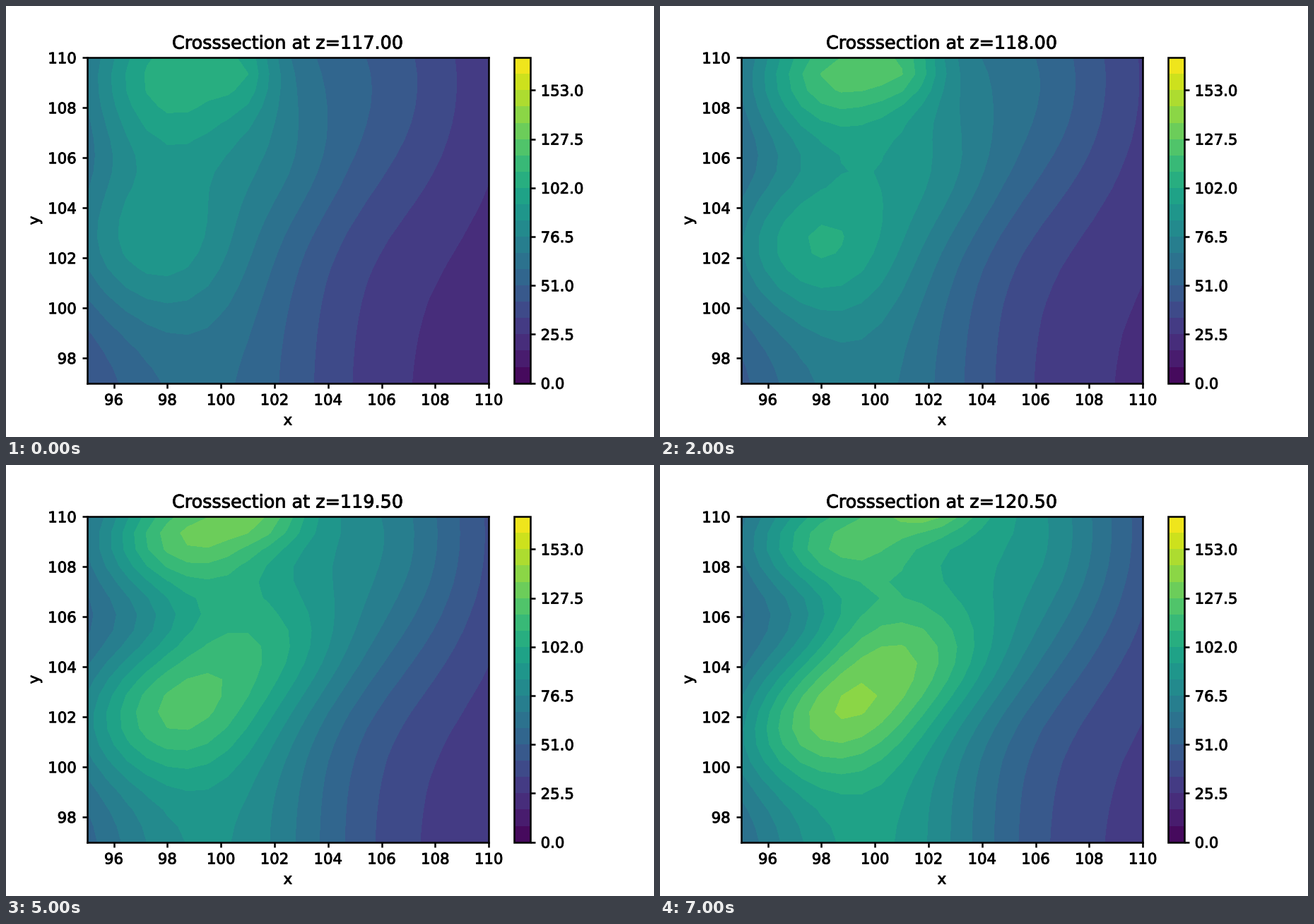
Recreate the animation shown at these times as a matplotlib script. Size 917 by 611 pixels, loop 8000 ms.

```python
import numpy as np
import matplotlib.pyplot as plt
from matplotlib.animation import FuncAnimation
from matplotlib.patheffects import withStroke
from matplotlib.text import Text

LINE = 1.2
plt.rcParams.update({
    "font.family": "DejaVu Sans", "font.size": 10, "axes.linewidth": LINE,
    "xtick.major.width": LINE, "ytick.major.width": LINE,
})

LEVELS = np.linspace(0, 170, 21)
HEIGHTS = 117 + 0.5 * np.arange(8)
xs = np.linspace(95, 110, 21)
ys = np.linspace(97, 110, 21)
X, Y = np.meshgrid(xs, ys)


def bump(amp, x, y, along, across, angle=0):
    """Gaussian hill with its long axis turned by angle degrees."""
    c, s = np.cos(np.radians(angle)), np.sin(np.radians(angle))
    u = (c * (X - x) + s * (Y - y)) / along
    v = (c * (Y - y) - s * (X - x)) / across
    return amp * np.exp(-(u**2 + v**2) / 2)


def field(z):
    t = (z - HEIGHTS[0]) / np.ptp(HEIGHTS)

    def mix(a, b):
        return a + (b - a) * t

    # A tall ridge along y, then the hills that drift and grow with z.
    total = mix(21, 30) + mix(40, 66) * np.exp(
        -(((X - mix(99.3, 99.7)) / 3.7) ** 2) / 2)
    # lower left
    total += bump(mix(36, 42), mix(96.7, 97.9), mix(102.8, 101.9),
                  mix(2.7, 2.8), mix(2.4, 1.7), mix(0, 20))
    # middle
    total += bump(mix(10, 25), mix(102.3, 101.9), mix(105.8, 104.6),
                  mix(1.7, 2.3), mix(2, 1.7))
    # upper right
    total += bump(mix(20, 43), mix(106, 106.2), mix(109, 109.4), 2.65, 4)
    # upper left
    total += bump(mix(48, 28), mix(97.8, 98.3), mix(109.3, 108.9),
                  mix(2.6, 2.2), mix(2.4, 1.1))
    # top edge
    total += bump(mix(18, 34), mix(100.9, 102), mix(109.6, 110.3),
                  mix(0.8, 1.4), mix(1.2, 0.7))
    # swells and fades halfway up
    total += bump(60 * t * (1 - t), 99.3, 109.5, 1.6, 1)
    # hollow on the left
    total += bump(mix(0, -8), 97, 105.7, 1.3, 1.3)
    return total


fig, ax = plt.subplots(figsize=(6.0015, 3.999), dpi=152.8)
fig.subplots_adjust(left=0.125, right=0.9, bottom=0.125, top=0.88)


def draw_field(z):
    ax.set_title(f"Crosssection at z={z:.2f}")
    return ax.contourf(xs, ys, field(z), levels=LEVELS, cmap="viridis")


bar = fig.colorbar(draw_field(HEIGHTS[0]), ax=ax)
bar.outline.set_linewidth(LINE)
ax.set(xlabel="x", ylabel="y", xlim=(95, 110), ylim=(97, 110),
       xticks=range(96, 111, 2), yticks=range(98, 111, 2))

# Slightly heavy lettering
fig.canvas.draw()
for text in fig.findobj(Text):
    text.set_path_effects([withStroke(linewidth=0.4, foreground="black")])


def update(i):
    for old in list(ax.collections):
        old.remove()
    draw_field(HEIGHTS[i])
    return []


anim = FuncAnimation(fig, update, frames=len(HEIGHTS), interval=1000,
                     init_func=lambda: [], repeat=True, repeat_delay=0)
plt.show()
```
